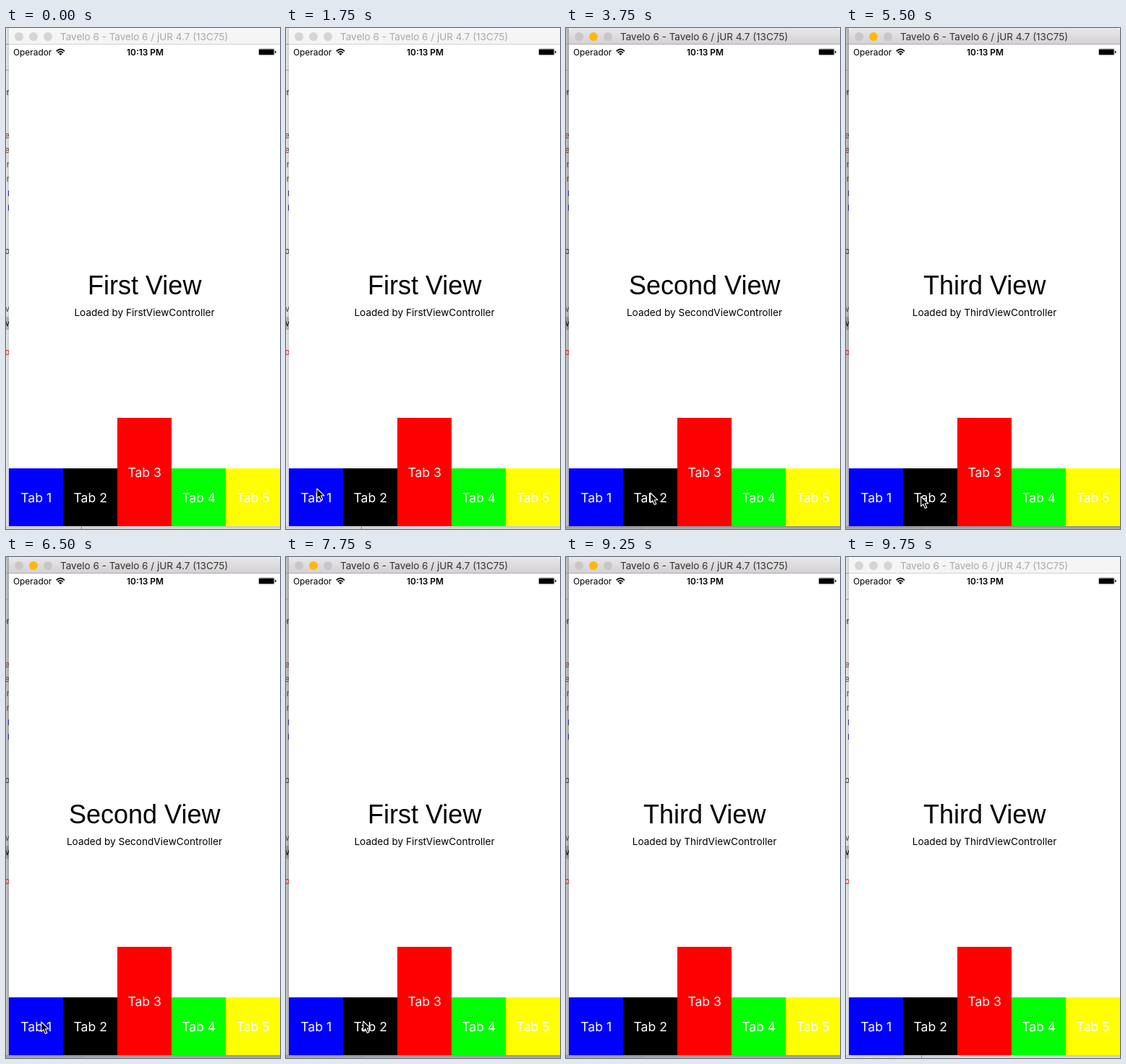
Write an HTML page that moves like this. It is 379x694 px and loops after 10 s.

```html
<!DOCTYPE html>
<html lang="en">
<head>
<meta charset="utf-8">
<title>Tab bar demo</title>
<style>
html, body { margin: 0; width: 100%; height: 100%; overflow: hidden; background: #fff; }
svg { display: block; width: 379px; height: 694px; }
text { font-family: Inter, Roboto, sans-serif; white-space: pre; }
#heading { font: 36px "Liberation Sans", Arial, sans-serif; }
#detail { font-size: 13.6px; }
#title { font-size: 13.5px; }
.tab { font-size: 17.6px; fill: #fff; }
.status { font-size: 11.9px; }
.mid { text-anchor: middle; }
.code text { font-size: 11px; text-anchor: end; }
</style>
</head>
<body>
<svg id="stage" viewBox="0 0 379 694" xmlns="http://www.w3.org/2000/svg">
  <defs>
    <linearGradient id="side">
      <stop id="sideA"/><stop id="sideB" offset="1"/>
    </linearGradient>
    <linearGradient id="under" x2="0" y2="1">
      <stop id="underA"/><stop id="underB" offset="1"/>
    </linearGradient>
    <linearGradient id="bar" x2="0" y2="1">
      <stop id="barA"/><stop id="barB" offset="1"/>
    </linearGradient>
  </defs>

  <!-- editor behind the window -->
  <rect width="4" height="694" fill="url(#side)"/>
  <path d="M0 22.5H4M0 58.5H4" stroke="#999"/>
  <rect y="400" width="4" height="18" fill="#000" opacity=".2"/>
  <g class="code" id="code"></g>
  <rect y="690" width="379" height="4" fill="url(#under)"/>
  <path d="M104.5 690V694" stroke="#888"/>

  <!-- window -->
  <path d="M4 24V4Q4 0 8 0H375Q379 0 379 4V24Z" fill="url(#bar)"/>
  <path id="rule" d="M4 22.5H379"/>
  <circle id="close" cx="18" cy="12" r="6"/>
  <circle id="mini" cx="38" cy="12" r="6"/>
  <circle id="zoom" cx="58" cy="12" r="6"/>
  <text id="title" x="75" y="17">Tavelo 6 - Tavelo 6 / jUR 4.7 (13C75)</text>
  <rect x="4" y="23" width="375" height="667" fill="#fff"/>

  <!-- status bar -->
  <text class="status" x="10" y="37.5">Operador</text>
  <g fill="none" stroke="#000" stroke-width="1.7">
    <path d="M69.6 32.2Q75.3 26.6 81 32.2M71.7 34.4Q75.3 30.9 78.9 34.4"/>
  </g>
  <path d="M73.1 35.7Q75.3 33.8 77.5 35.7L75.3 38Z"/>
  <text class="status mid" x="192.5" y="37.5" font-weight="600">10:13 PM</text>
  <rect x="349.3" y="28.8" width="22" height="9" rx="1.8" fill="none" stroke="#000" stroke-width=".5" opacity=".6"/>
  <rect x="350" y="29.5" width="20.6" height="7.6" rx="1"/>
  <path d="M372.2 31.5Q373.8 32 373.8 33.3Q373.8 34.6 372.2 35.1Z"/>

  <text id="heading" class="mid" x="191.7" y="369"></text>
  <text id="detail" class="mid" x="191.5" y="399"></text>
  <g id="tabs"></g>

  <path id="cursor" d="M.7 1V14.6L3.9 11.7L6.3 17.3L8.8 16.2L6.4 10.7H10.8Z" fill="#000" stroke="#fff" stroke-width="1.1" stroke-linejoin="round"/>
</svg>
<script>
const LOOP = 10000;
const $ = id => document.getElementById(id);

function add(parent, tag, attrs, text = "") {
  const el = document.createElementNS("http://www.w3.org/2000/svg", tag);
  for (const key in attrs) el.setAttribute(key, attrs[key]);
  el.textContent = text;
  parent.append(el);
}

// Line ends that peek out beside the window: text, baseline, colour
[["er", 93, "#222"], ["e", 153, "#643820"], ["e", 173, "#643820"],
 ["r", 193, "#643820"], ["r", 213, "#643820"], ["l", 233, "#2020a0"],
 ["l", 253, "#2020a0"], ["o", 313, "#222"], ["ev", 393, "#444"],
 ["ev", 413, "#000"], ["o", 453, "#c41a16"]
].forEach(([s, y, fill]) => add($("code"), "text", { x: 5, y, fill }, s));

["#00f", "#000", "#f00", "#0f0", "#ff0"].forEach((fill, i) => {
  const x = 4 + 75 * i, top = i === 2 ? 540 : 610;
  add($("tabs"), "rect", { x, y: top, width: 75, height: 690 - top, fill });
  add($("tabs"), "text", { x: x + 37.7, y: (top + 690) / 2 + 6.7, class: "tab mid" }, "Tab " + (i + 1));
});

const views = [[0, "First"], [3750, "Second"], [5000, "Third"], [6000, "Second"],
               [7250, "First"], [8000, "Second"], [9000, "Third"]];

// Pointer moves: start, end, from, to; sampled four times a second
const moves = [
  [750, 1750, [252, 258], [42, 637]],
  [1750, 2250, [42, 637], [41, 643]],
  [2750, 3250, [41, 643], [116, 643]],
  [4000, 4500, [116, 643], [182, 625]],
  [5000, 5500, [182, 625], [103, 648]],
  [6250, 6500, [103, 648], [48, 643]],
  [7250, 7750, [48, 643], [106, 642]],
  [8000, 8250, [106, 642], [168, 615]],
  [8250, 8500, [168, 615], [193, 608]]
];

const themes = {
  active: { sideA: "#c9c9c9", sideB: "#a2a2a2", underA: "#8e8e8e", underB: "#b0b0b0",
            barA: "#e9e7e9", barB: "#d1cfd1", rule: "#b0aeb0", title: "#333",
            close: "#c8c6c8", mini: "#fdb80f", zoom: "#c8c6c8" },
  idle:   { sideA: "#e9e9e9", sideB: "#cdcdcd", underA: "#c4c4c4", underB: "#dedede",
            barA: "#f6f6f6", barB: "#f4f4f4", rule: "#d3d3d3", title: "#a9a9a9",
            close: "#d5d5d5", mini: "#d5d5d5", zoom: "#d5d5d5" }
};

function pointerAt(t) {
  if (t < 750 || t >= 9250) return null;
  const [start, end, from, to] = moves.filter(m => t >= m[0]).pop();
  const k = Math.min(1, (t - start) / (end - start));
  return from.map((v, i) => Math.round(v + (to[i] - v) * k));
}

function draw(time) {
  const t = Math.floor(time % LOOP / 250) * 250;
  const name = views.filter(v => t >= v[0]).pop()[1];
  $("heading").textContent = name + " View";
  $("detail").textContent = `Loaded by ${name}ViewController`;

  const theme = themes[t >= 2750 && t < 9750 ? "active" : "idle"];
  for (const id in theme) {
    const el = $(id);
    const prop = el.tagName === "stop" ? "stop-color" : id === "rule" ? "stroke" : "fill";
    el.setAttribute(prop, theme[id]);
  }

  const p = pointerAt(t);
  $("cursor").setAttribute("visibility", p ? "visible" : "hidden");
  if (p) $("cursor").setAttribute("transform", `translate(${p})`);
}

const begin = performance.now();
function tick() {
  draw(performance.now() - begin);
  requestAnimationFrame(tick);
}
tick();
</script>
</body>
</html>
```
